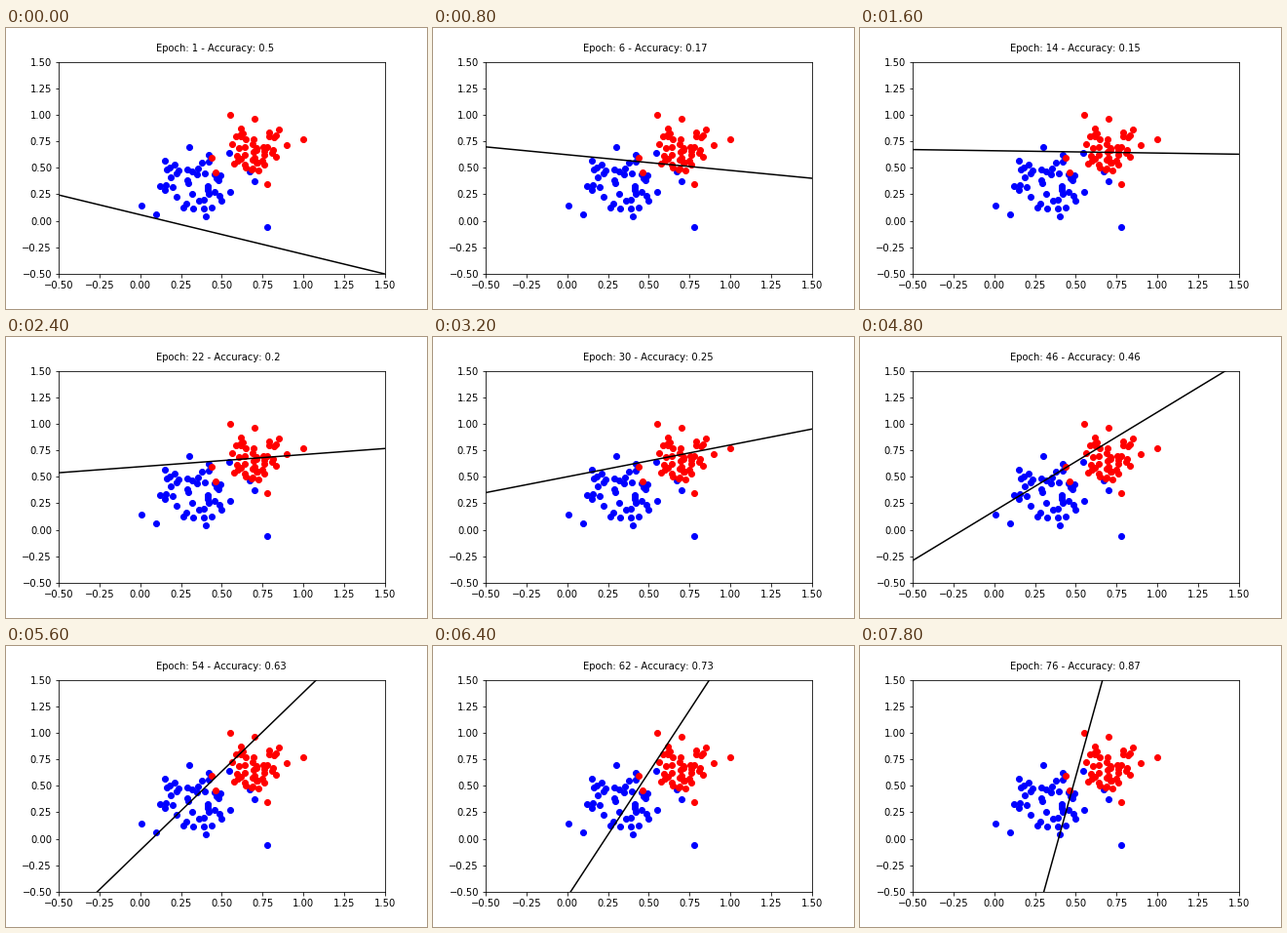
Recreate the animation shown at these times as a matplotlib script. Size 432x288 px, loop 8 s.

```python
import numpy as np
import matplotlib.pyplot as plt
from matplotlib.animation import FuncAnimation

FRAMES, STEP = 40, 200
PIVOT = (.512, .654)

plt.rcParams["text.kerning_factor"] = 6
rng = np.random.default_rng(4)


def cluster(center, radii, count, outliers):
    """Scatter points over an ellipse, denser in the middle, plus outliers."""
    r = rng.random(count) ** .65
    a = rng.random(count) * 2 * np.pi
    ring = np.column_stack([r * np.cos(a), r * np.sin(a)])
    return np.vstack([center + ring * radii, outliers])


blue = cluster((.34, .34), (.23, .24), 40, [
    (.78, -.06), (.70, .37), (.67, .47), (.30, .70), (.01, .14),
    (.10, .06), (.40, .04), (.15, .57), (.545, .64), (.42, .62)])
red = cluster((.69, .71), (.18, .26), 42, [
    (.55, 1.0), (1.0, .77), (.78, .35), (.90, .71),
    (.44, .59), (.46, .46), (.85, .86), (.68, .48)])


def epoch_at(i):
    return i + 1 if i < 3 else 2 * i - 2


def settle(t):
    return np.exp(-.4 * (t - 1))


def boundary_y(x, t):
    """The boundary climbs to the pivot, then turns about it."""
    slope = (t - 15.4) / (86.42 - 1.4294 * t + .005737 * t ** 2)
    slope -= .203 * settle(t)
    return PIVOT[1] - .787 * settle(t) + slope * (x - PIVOT[0])


def accuracy(t):
    trend = np.interp(t, [1, 14, 30, 40, 54, 62, 76],
                      [.1, .15, .25, .34, .63, .73, .87])
    return round(float(trend + .4 * settle(t)), 2)


fig = plt.figure(figsize=(6, 4), dpi=72, facecolor="white")
ax = fig.add_axes([.125, .125, .775, .755])
ticks = np.linspace(-.5, 1.5, 9)
ax.set(xlim=(-.5, 1.5), ylim=(-.5, 1.5), xticks=ticks, yticks=ticks)
for axis in (ax.xaxis, ax.yaxis):
    axis.set_major_formatter("{x:.2f}")

ax.plot(*blue.T, "o", color="blue")
ax.plot(*red.T, "o", color="red")
boundary, = ax.plot([], [], color="black", lw=1.5)
title = ax.text(.3, 1.05, "", transform=ax.transAxes, fontsize=10)
x_ends = np.array([-.5, 1.5])


def draw(i):
    t = epoch_at(i)
    boundary.set_data(x_ends, boundary_y(x_ends, t))
    title.set_text(f"Epoch: {t} - Accuracy: {accuracy(t)}")
    return boundary, title


anim = FuncAnimation(fig, draw, frames=FRAMES, interval=STEP,
                     init_func=lambda: draw(0), repeat=True, repeat_delay=0)
plt.show()
```
